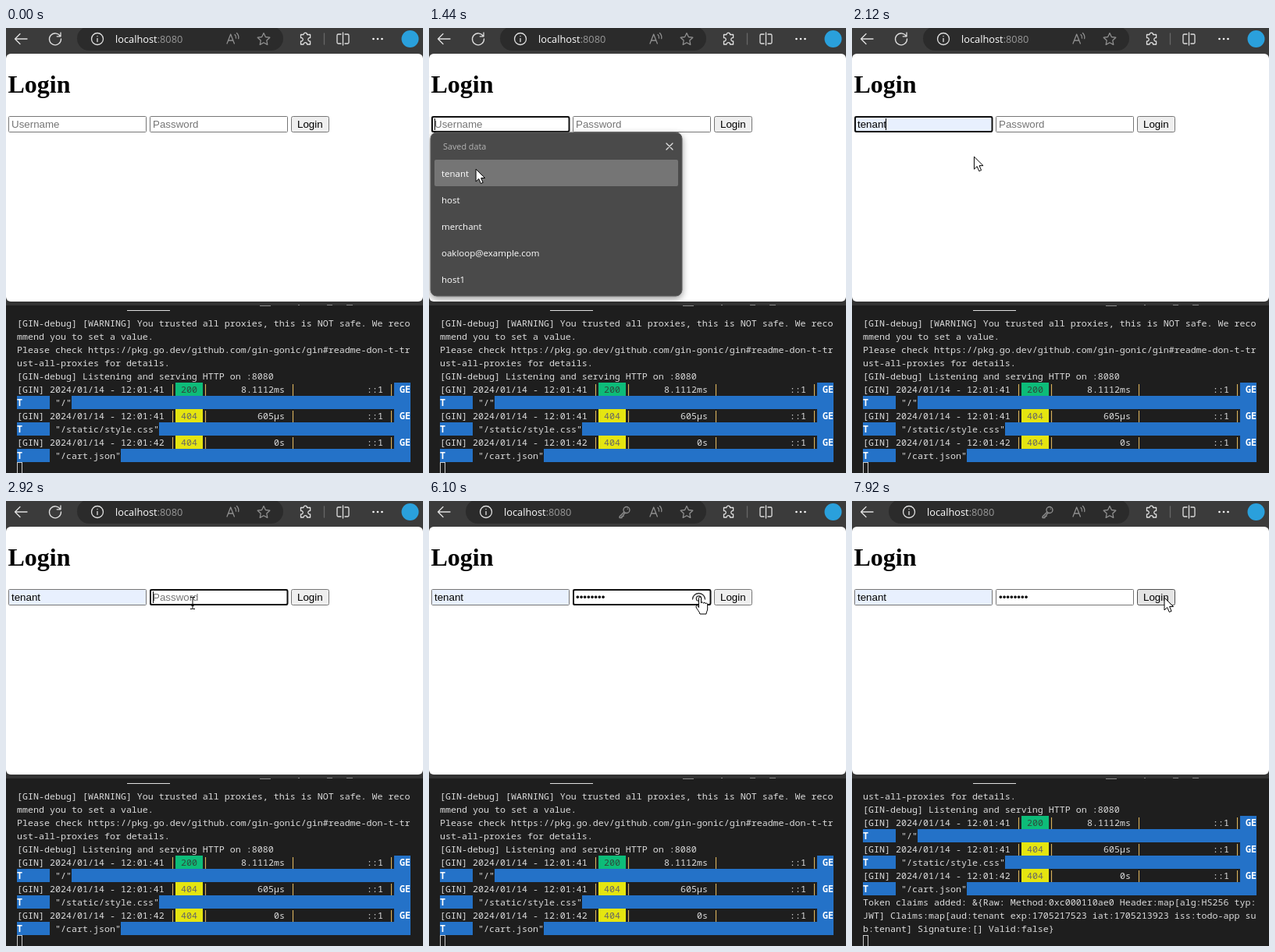
Recreate the animation shown at these times as an HTML page. Size 534 px wide and 571 px high, loop 8000 ms.

```html
<!DOCTYPE html>
<html lang="en">
<head>
<meta charset="utf-8">
<title>Login demo</title>
<style>
html, body { margin: 0; height: 100%; overflow: hidden; background: #3b3b3b; }
svg { display: block; }
text { white-space: pre; }
.icon { fill: none; stroke: #e0e0e0; stroke-width: 1.3; stroke-linecap: round; stroke-linejoin: round; }
.dim { stroke: #8f8f8f; }
.ui { font-family: "Open Sans", "Noto Sans", sans-serif; fill: #fff; }
.form { font: 13.333px "Liberation Sans", Arial, sans-serif; }
.hint { fill: #757575; }
.box { fill: #fff; stroke: #767676; }
.hover { stroke: #4f4f4f; }
.ring { fill: none; stroke: #101010; stroke-width: 2; }
.caret { fill: #000; }
#log { font: 500 11.667px "Noto Sans Mono", "DejaVu Sans Mono", monospace; fill: #dcdcdc; }
</style>
</head>
<body>
<svg width="534" height="571" viewBox="0 0 534 571">
  <!-- Browser toolbar -->
  <rect width="534" height="352" fill="#3b3b3b"/>
  <path class="icon" d="M27 14H11.5M18 7.5L11.5 14l6.5 6.5"/>
  <path class="icon" d="M69.5 10.5A7.5 7.5 0 1 0 70.5 14M70 6v4.8h-4.8"/>
  <rect id="pill" y="-2" height="31" rx="15.5" fill="#2b2b2b"/>
  <g id="url">
    <g class="icon"><circle cx="117" cy="14" r="7.5"/><path d="M117 13.5v4M117 10.3v.2"/></g>
    <text class="ui" x="140" y="19" font-size="12.8">localhost<tspan fill="#9a9a9a">:8080</tspan></text>
  </g>
  <g id="key" class="icon dim"><circle cx="253" cy="11.5" r="4"/><path d="M250 14l-6 6v1.5h3v-2h2v-2l2.5-2.3M254.3 10.2v.1"/></g>
  <path class="icon dim" d="M283 20l4.7-12 4.7 12M284.8 16h6M293 8.5q2 2 1.5 4.5M295.5 6.5q3 3 2.2 7"/>
  <path class="icon dim" d="M330 6.5l2.4 5 5.4.7-4 3.8 1 5.4-4.8-2.7-4.8 2.7 1-5.4-4-3.8 5.4-.7z"/>
  <path class="icon" d="M377.5 8.5h3.5a2.3 2.3 0 1 1 4.6 0h4v4a2.3 2.3 0 1 0 0 4.5v4h-4a2.3 2.3 0 1 0-4.6 0h-3.5v-4a2.3 2.3 0 1 0 0-4.5z"/>
  <path class="icon" style="stroke:#666" d="M407.5 7v14"/>
  <path class="icon" d="M429 8h-3.5q-1.500 0-1.500 1.500v9q0 1.500 1.500 1.500h3.500M434 8h3.500q1.500 0 1.500 1.500v9q0 1.500-1.500 1.500H434M431.500 6v16"/>
  <path class="icon" style="stroke:#fff;stroke-width:2.6" d="M470.5 14h.01M476 14h.01M481.5 14h.01"/>
  <circle cx="517.5" cy="14" r="11" fill="#2aa0dc"/>

  <!-- Page -->
  <rect y="351" width="534" height="5" fill="#333"/>
  <rect y="33" width="534" height="318" rx="6" fill="#fff"/>
  <text x="2.5" y="83" font-family="'Liberation Serif', Times, serif" font-weight="bold" font-size="32">Login</text>
  <g class="form">
    <rect id="nameBox" class="box" x="3.5" y="113.5" width="176" height="20" rx="1"/>
    <rect id="passBox" class="box" x="184.5" y="113.5" width="176" height="20" rx="1"/>
    <rect id="button" class="box" x="365.5" y="113.5" width="48" height="20" rx="2"/>
    <text x="373" y="128">Login</text>
    <text id="nameText" x="7" y="128"></text>
    <text id="passText" x="188" y="128"></text>
  </g>
  <rect id="nameRing" class="ring" x="4" y="114" width="175.5" height="19" rx="2"/>
  <rect id="passRing" class="ring" x="185" y="114" width="175.5" height="19" rx="2"/>
  <rect id="nameCaret" class="caret" y="116" width="1" height="15"/>
  <rect id="passCaret" class="caret" y="116" width="1" height="15"/>
  <g id="eye" class="icon" style="stroke:#333"><path d="M337.5 126a8 7.5 0 0 1 16 0"/><circle cx="345.5" cy="125" r="3.2"/></g>

  <!-- Terminal -->
  <rect y="356" width="534" height="215" fill="#1e1e1e"/>
  <path d="M155 362.5h55" stroke="#e0e0e0"/>
  <path d="M325 356.5h14M374 355.5h2M411 355.5h7M436 355.5h8" stroke="#888"/>
  <svg y="370" width="534" height="201"><g id="log"></g></svg>
  <rect x="14.5" y="557.5" width="6" height="17" fill="none" stroke="#ccc"/>

  <!-- Saved entries -->
  <g id="panel" class="ui" font-size="11.5">
    <rect x="2" y="134" width="322" height="210" rx="8" fill="#4a4a4a" stroke="#626262" style="filter:drop-shadow(0 3px 4px #0006)"/>
    <text x="18" y="156" font-size="10.8" fill="#b4b4b4">Saved data</text>
    <path class="icon" d="M304 148l8 8M312 148l-8 8"/>
    <rect id="row" x="7" y="169" width="312" height="34" rx="2" fill="#757575"/>
  </g>

  <g id="pointer" stroke="#000" stroke-linejoin="round">
    <path id="arrow" fill="#fff" d="M0 0V16l3.7-3.5 2.6 6 2.8-1.2-2.5-5.8h5z"/>
    <path id="beam" fill="none" d="M-3-7.5h2.5l.5.5.5-.5H3M0-7V7M-3 7.5h2.5L0 7l.5.5H3M-1.5 3.5h3"/>
    <path id="hand" fill="#fff" d="M-1.5 1.5a1.5 1.5 0 0 1 3 0V8c0-1.5 3-1.3 3 .3.3-1.4 2.8-1 2.8.5.3-1.2 2.4-.8 2.4.7V15c0 3-1.5 4-1.7 7H0c-.5-3-4-6-5-9-.6-2 1.5-2.6 2.5-1l1 1.6z"/>
  </g>
</svg>
<script>
const LOOP = 8000, BLINK = 530, CHAR = 7, LINE = 17;
const el = Object.fromEntries([...document.querySelectorAll('[id]')].map(e => [e.id, e]));
const account = 'tenant';

function add(parent, tag, attrs, text = '') {
  const node = document.createElementNS('http://www.w3.org/2000/svg', tag);
  for (const k in attrs) node.setAttribute(k, attrs[k]);
  node.textContent = text;
  return parent.appendChild(node);
}

[account, 'host', 'merchant', 'oakloop@example.com', 'host1'].forEach((entry, i) =>
  add(el.panel, 'text', { x: 16, y: 191 + 34 * i }, entry));

const colX = col => 14 + col * CHAR;
const put = (col, row, text, attrs = {}) =>
  add(el.log, 'text', { x: colX(col), y: row * LINE + 13, ...attrs }, text);
const fill = (col, row, end, color) =>
  add(el.log, 'rect', { x: colX(col), y: row * LINE, width: (end - col) * CHAR, height: LINE, fill: color });
const pipe = (col, row) =>
  put(col, row, '|', { x: colX(col) + CHAR / 2, 'text-anchor': 'middle', 'font-size': 15, fill: '#d9b25c' });

function request(row, time, status, took, path) {
  const blue = '#2472c8', ok = status === 200;
  const method = { fill: '#fff', 'font-weight': 600 };
  put(0, row, `[GIN] 2024/01/14 - ${time}`);
  for (const col of [28, 34, 50, 68]) pipe(col, row);
  fill(29, row, 34, ok ? '#0dbc79' : '#e5e510');
  put(30, row, status, { fill: ok ? '#30473d' : '#666' });
  put(49 - took.length, row, took);
  put(64, row, '::1');
  fill(69, row, 72, blue);
  put(70, row, 'GE', method);
  fill(0, row + 1, 6, blue);
  put(0, row + 1, 'T', method);
  put(7, row + 1, `"${path}"`);
  fill(9 + path.length, row + 1, 72, blue);
}

[
  '[GIN-debug] [WARNING] You trusted all proxies, this is NOT safe. We reco',
  'mmend you to set a value.',
  'Please check https://pkg.go.dev/github.com/gin-gonic/gin#readme-don-t-tr',
  'ust-all-proxies for details.',
  '[GIN-debug] Listening and serving HTTP on :8080'
].forEach((line, i) => put(0, i, line));
request(5, '12:01:41', 200, '8.1112ms', '/');
request(7, '12:01:41', 404, '605µs', '/static/style.css');
request(9, '12:01:42', 404, '0s', '/cart.json');
const claims = [
  'Token claims added: &{Raw: Method:0xc000110ae0 Header:map[alg:HS256 typ:',
  `JWT] Claims:map[aud:${account} exp:1705217523 iat:1705213923 iss:todo-app su`,
  `b:${account}] Signature:[] Valid:false}`
].map((line, i) => put(0, 11 + i, line));

// Pointer path: time, x, y
const path = [
  [320, -14, 108], [660, 48, 122], [1210, 48, 122], [1440, 60, 181], [1550, 67, 186],
  [1800, 67, 186], [2020, 135, 174], [2510, 239, 131], [5790, 239, 131],
  [6100, 347, 123], [6970, 347, 123], [7270, 400, 124]
];
const keyTimes = [3620, 3730, 4040, 4190, 4390, 4670, 5000, 5250];

const ramp = (t, a, b) => Math.min(1, Math.max(0, (t - a) / (b - a)));
const show = (node, on) => node.style.display = on ? '' : 'none';
const blink = (t, since) => Math.floor((t - since) / BLINK) % 2 === 0;

function pointerAt(t) {
  const i = path.findIndex(p => p[0] > t);
  if (i < 0) return path.at(-1).slice(1);
  if (i === 0) return path[0].slice(1);
  const [a, b] = [path[i - 1], path[i]], k = ramp(t, a[0], b[0]);
  return [1, 2].map(n => a[n] + (b[n] - a[n]) * k);
}

function setText(node, value, hint) {
  node.textContent = value || hint;
  node.classList.toggle('hint', !value);
}

function draw(t) {
  const [x, y] = pointerAt(t);
  const over = (a, b) => y >= 113 && y < 134 && x >= a && x < b;
  const onName = over(3, 180), onPass = over(184, 361), onButton = over(365, 414);
  const filled = t >= 1900, typed = keyTimes.filter(k => k <= t), sent = t >= 7650;
  const eye = typed.length > 0 && !sent;

  el.pointer.setAttribute('transform', `translate(${x} ${y})`);
  const hand = eye && over(336, 356), beam = !hand && (onName || onPass);
  show(el.hand, hand);
  show(el.beam, beam);
  show(el.arrow, !hand && !beam);

  el.nameBox.classList.toggle('hover', onName);
  el.passBox.classList.toggle('hover', onPass);
  el.button.classList.toggle('hover', onButton);
  el.nameBox.style.fill = filled ? '#e8f0fe' : '#fff';
  const pressed = sent && t < 7800;
  el.button.style.fill = pressed ? '#f5f5f5' : onButton ? '#e5e5e5' : '#efefef';

  setText(el.nameText, filled ? account : '', 'Username');
  setText(el.passText, '•'.repeat(typed.length), 'Password');
  show(el.nameRing, t >= 920 && t < 2800);
  show(el.passRing, t >= 2800 && !sent);
  el.nameCaret.setAttribute('x', filled ? 43 : 7);
  el.passCaret.setAttribute('x', Math.floor(188 + typed.length * 4.67));
  show(el.nameCaret, t >= 920 && t < 2800 && blink(t, filled ? 1900 : 920));
  show(el.passCaret, t >= 2800 && t < 6610 && blink(t, typed.at(-1) ?? 2800));
  show(el.eye, eye);

  const barWide = t >= 3680, left = barWide ? 47 : 91;
  el.pill.setAttribute('x', left);
  el.pill.setAttribute('width', 355 - left);
  el.url.setAttribute('transform', `translate(${left - 91})`);
  show(el.key, barWide);

  const open = ramp(t, 900, 1060) * (1 - ramp(t, 1930, 2115));
  const scale = 0.95 + 0.05 * open;
  show(el.panel, open > 0);
  el.panel.setAttribute('opacity', open);
  el.panel.setAttribute('transform', `translate(163 239) scale(${scale}) translate(-163 -239)`);
  show(el.row, y >= 169 && y < 203);

  const logged = t >= 7900;
  el.log.setAttribute('transform', `translate(0 ${logged ? -3 * LINE : 0})`);
  claims.forEach(line => show(line, logged));
}

const start = performance.now();
function tick() {
  draw((performance.now() - start) % LOOP);
  requestAnimationFrame(tick);
}
tick();
</script>
</body>
</html>
```
